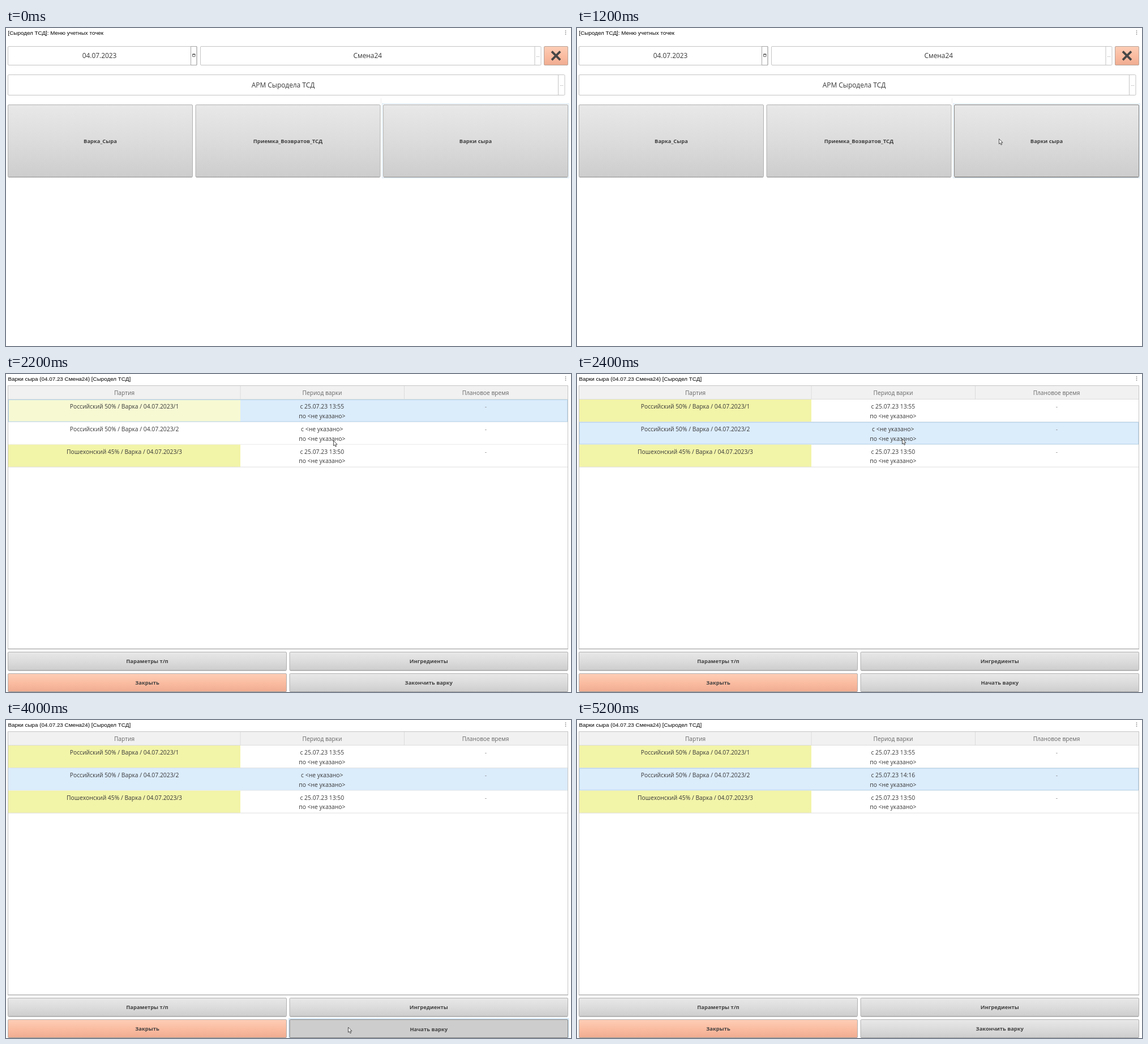
These frames come from a looping animation (998 px wide and 561 px high, 5.4 s). An HTML page:

```html
<!DOCTYPE html>
<html lang="ru">
<head>
<meta charset="utf-8">
<title>Варки сыра</title>
<style>
html, body { margin: 0; width: 100%; height: 100%; overflow: hidden; background: #fff; }
svg { display: block; width: 998px; height: 561px; }
text { font-family: "Open Sans", "Noto Sans", sans-serif; fill: #383838; text-anchor: middle; }
.title { font: 9.85px "Liberation Sans", Arial, sans-serif; fill: #000; text-anchor: start; }
.field { font-size: 11.9px; }
.head { font-size: 10.2px; fill: #666; }
.cell { font-size: 10.35px; }
.label { font-size: 9.4px; font-weight: 700; fill: #404040; }
</style>
</head>
<body>
<svg id="stage" viewBox="0 0 998 561">
  <defs>
    <linearGradient id="gray" x2="0" y2="1">
      <stop stop-color="#e8e8e8"/><stop offset=".5" stop-color="#dcdcdc"/><stop offset="1" stop-color="#cdcdcd"/>
    </linearGradient>
    <linearGradient id="peach" x2="0" y2="1">
      <stop stop-color="#fdceb6"/><stop offset=".55" stop-color="#fabba0"/><stop offset="1" stop-color="#efac91"/>
    </linearGradient>
  </defs>
</svg>
<script>
const LOOP = 5400;
const stage = document.getElementById('stage');

function add(parent, tag, attrs, content) {
  const node = document.createElementNS('http://www.w3.org/2000/svg', tag);
  for (const key in attrs) node.setAttribute(key, attrs[key]);
  if (content) node.textContent = content;
  return parent.appendChild(node);
}
const group = parent => add(parent, 'g', {});
const text = (parent, x, y, cls, content) => add(parent, 'text', { x, y, class: cls }, content);
const box = (parent, x, y, width, height, fill, stroke = 'none', rx = 0) =>
  add(parent, 'rect', { x, y, width, height, fill, stroke, rx });
const line = (parent, d, stroke, width = 1) =>
  add(parent, 'path', { d, stroke, 'stroke-width': width, fill: 'none' });
const show = (node, on) => node.setAttribute('visibility', on ? 'inherit' : 'hidden');

function button(parent, x, y, w, h, name, fill = 'url(#gray)') {
  const face = box(parent, x, y, w, h, fill, '#b0b0b0', 1.5);
  const edge = line(parent, `M${x + 1} ${y + h}h${w - 2}`, '#9c9c9c');
  const label = text(parent, x + w / 2, y + h / 2 + 3.4, 'label', name);
  return { face, edge, label };
}

function setHover(btn, on) {
  btn.face.setAttribute('stroke', on ? '#808080' : '#b0b0b0');
  btn.edge.setAttribute('stroke', on ? '#808080' : '#9c9c9c');
}

function field(parent, x, y, w, h, split, value) {
  box(parent, x, y, w, h, '#fff', '#c4c4c4', 1.5);
  line(parent, `M${split} ${y}v${h}`, '#c4c4c4');
  text(parent, (x + split) / 2, y + h / 2 + 4.4, 'field', value);
}

function ellipsis(parent, x, y) {
  for (const dx of [-2, 0, 2]) box(parent, x + dx - .5, y, 1, 1, '#aaa');
}

// Menu screen
const menu = group(stage);
text(menu, 3.5, 12, 'title', '[Сыродел ТСД]: Меню учетных точек');
field(menu, 3.5, 32.5, 333.5, 33, 326.5, '04.07.2023');
line(menu, 'M326.5 32.5h10.5v33h-10.5z', '#a6a6a6');
box(menu, 329.5, 46, 4.5, 4.5, '#fff', '#666', .5);
line(menu, 'M329.3 46.5h5', '#555', 1.5);
field(menu, 343.5, 32.5, 601.5, 33, 934, 'Смена24');
ellipsis(menu, 939.5, 50);
field(menu, 3.5, 82.5, 983.5, 36, 975.5, 'АРМ Сыродела ТСД');
ellipsis(menu, 981.5, 101);
box(menu, 950.5, 32.5, 42, 33, 'url(#peach)', '#b5a299', 1.5);
line(menu, 'M964 41.3l15 15m0 -15l-15 15', '#464646', 3.8);
line(menu, 'M662.5 124v9', '#ececec');
box(menu, 664.5, 133.5, 329.5, 131, '#fff', '#d6e8f4');
button(menu, 3.5, 135.5, 326, 127.5, 'Варка_Сыра');
button(menu, 335, 135.5, 326, 127.5, 'Приемка_Возвратов_ТСД');
const brews = button(menu, 666.5, 135.5, 326, 127.5, 'Варки сыра');

// Batch table screen
const batch = group(stage);
text(batch, 3.5, 12, 'title', 'Варки сыра (04.07.23 Смена24) [Сыродел ТСД]');
box(batch, 3.5, 20.5, 989, 464.5, '#fff', '#c4c4c4');
line(batch, 'M3 485h990', '#a8a8a8');
box(batch, 4, 21, 988, 23.5, '#f1f1f1');
line(batch, 'M4 44.5h988M414 21v23.5M703.5 21v23.5', '#dcdcdc');
[[209, 'Партия'], [558.5, 'Период варки'], [847, 'Плановое время']]
  .forEach(([x, name]) => text(batch, x, 37, 'head', name));

const NONE = '<не указано>';
const rows = [
  ['Российский 50% / Варка / 04.07.2023/1', '25.07.23 13:55'],
  ['Российский 50% / Варка / 04.07.2023/2', NONE],
  ['Пошехонский 45% / Варка / 04.07.2023/3', '25.07.23 13:50']
].map(([name, start], i) => {
  const y = 45 + i * 39.8;
  const back = box(batch, 4, y, 988, 39.5, '#fff');
  const mark = box(batch, 4, y, 410, 39.5, '#f2f4a8');
  line(batch, `M4 ${y + 39.5}h988`, '#dedede');
  const frame = box(batch, 4.5, y + .5, 987, 38.5, 'none', '#b3d4ec');
  text(batch, 209, y + 16.4, 'cell', name);
  const from = text(batch, 558.3, y + 16.4, 'cell', 'с ' + start);
  text(batch, 558.3, y + 32.8, 'cell', 'по ' + NONE);
  text(batch, 847.5, y + 16.4, 'cell', '-').style.fill = '#888';
  return { back, mark, frame, from };
});

button(batch, 3.5, 490.5, 492, 32.5, 'Параметры т/п');
const parts = button(batch, 501, 490.5, 491.5, 32.5, 'Ингредиенты');
button(batch, 3.5, 528.5, 492, 32, 'Закрыть', 'url(#peach)');
const halo = box(batch, 499.5, 526.5, 494.5, 36, '#dcecf8', '#cfe4f4');
const action = button(batch, 501, 528.5, 491.5, 32, 'Закончить варку');

for (const y of [5, 8, 11]) add(stage, 'circle', { cx: 988.5, cy: y, r: .85, fill: '#777' });

const cursor = add(stage, 'path', {
  d: 'M.5 .5V9.6L2.6 7.8L4 11.2L5.6 10.5L4.2 7.2H7Z',
  fill: '#fff', stroke: '#3c3c3c', 'stroke-width': .9, 'stroke-linejoin': 'round'
});

// Pointer stops: time, x, y; it is hidden outside this span
const stops = [
  [400, 61, 171], [600, 499, 177], [800, 730, 194], [1000, 745, 195],
  [2000, 675, 158], [2200, 578, 117], [2400, 574, 114], [3000, 636, 351],
  [3200, 622, 451], [3400, 615, 510.5], [3600, 608, 524], [3800, 604, 541.5],
  [5000, 403, 419]
];

function draw(t) {
  const within = (a, b) => t >= a && t < b;
  const inMenu = t < 1400;
  show(menu, inMenu);
  show(batch, !inMenu);

  const stop = stops.filter(s => s[0] <= t).pop();
  show(cursor, within(400, 5200));
  if (stop) cursor.setAttribute('transform', `translate(${stop[1]} ${stop[2]})`);

  const current = t < 2400 ? 0 : 1;
  const pressed = within(4000, 4400);
  const started = t >= 4400;
  rows.forEach((row, i) => {
    const on = i === current;
    row.back.setAttribute('fill', on ? '#dbecfb' : '#fff');
    row.mark.setAttribute('fill', on ? '#f7f9d3' : '#f2f4a8');
    show(row.mark, i !== 1);
    show(row.frame, on && !pressed);
  });
  rows[1].from.textContent = 'с ' + (started ? '25.07.23 14:16' : NONE);

  setHover(brews, within(1200, 1400));
  setHover(parts, within(3200, 3400));
  setHover(action, within(3600, 5000));
  show(halo, pressed);
  action.face.setAttribute('fill', pressed ? '#cdcdcd' : 'url(#gray)');
  action.label.setAttribute('y', pressed ? 548.5 : 547.9);
  action.label.textContent = within(2400, 4400) ? 'Начать варку' : 'Закончить варку';
}

const begin = performance.now();
function tick() {
  draw((performance.now() - begin) % LOOP);
  requestAnimationFrame(tick);
}
tick();
</script>
</body>
</html>
```
